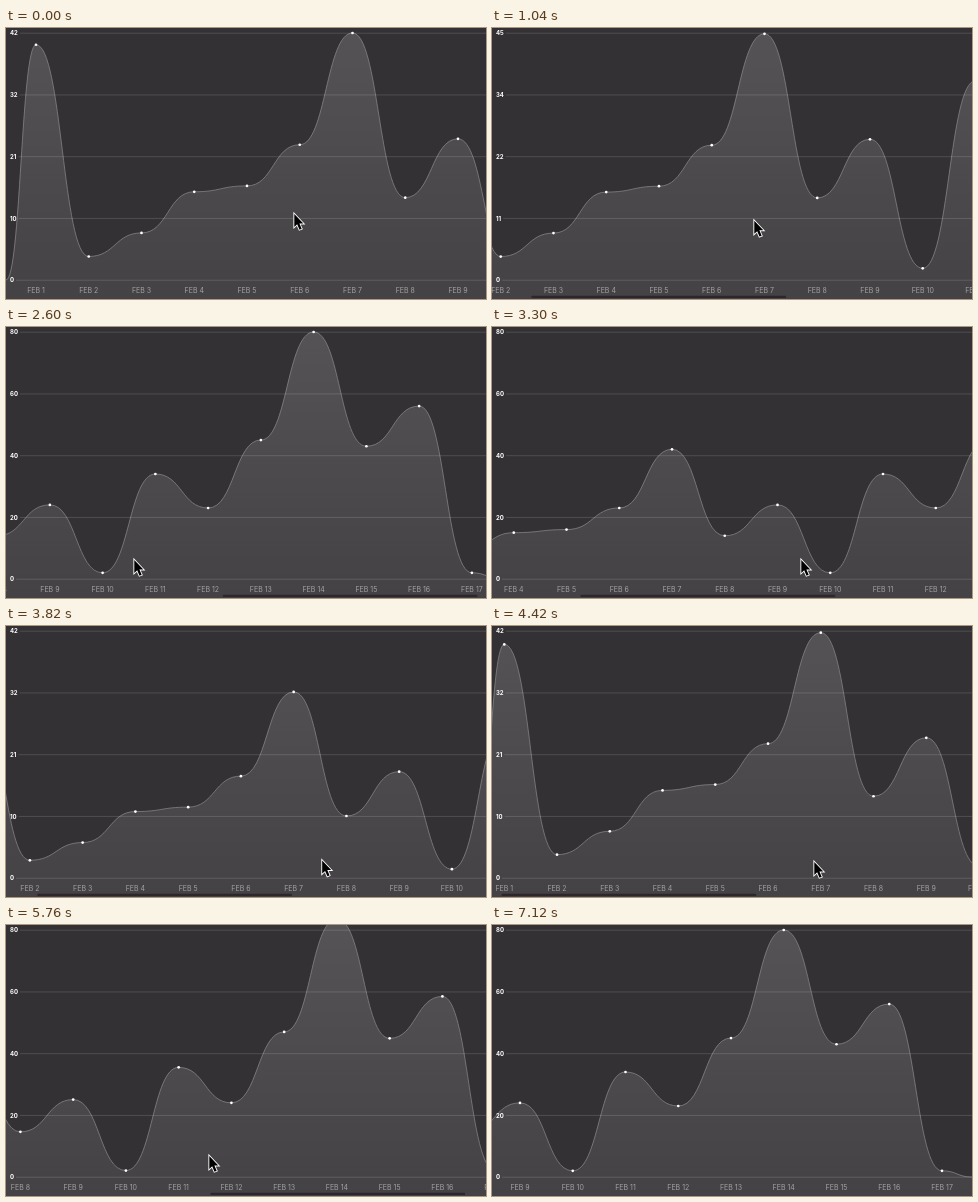
An HTML page with a canvas for the animation above (7980 ms loop, 480 by 271 pixels).

```html
<!DOCTYPE html>
<html lang="en">
<head>
<meta charset="utf-8">
<title>Scrolling chart</title>
<style>
  html, body { margin: 0; width: 100%; height: 100%; overflow: hidden; background: #333133; }
  canvas { display: block; width: 480px; height: 271px; }
</style>
</head>
<body>
<canvas id="stage"></canvas>
<script>
const W = 480, H = 271, LOOP = 7980;
const ZERO = 252, PLOT = 247, PAD = 30, STEP = 52.75;
const values = [40, 4, 8, 15, 16, 23, 42, 14, 24, 2, 34, 23, 45, 80, 43, 56, 2];
const CONTENT = 2 * PAD + STEP * (values.length - 1), MAX_SCROLL = CONTENT - W;

// Finger drags followed by a glide towards a resting place
const flicks = [
  { start: 820, end: 1132, move: 125, power: 1.5, rest: MAX_SCROLL },
  { start: 2680, end: 3132, move: -177.5, power: 1.2, rest: 0 },
  { start: 4945, end: 5245, move: 119, power: 2, rest: 529 }
];
const GLIDE = 500, SPRING = 0.0109;

// Start time and new top of the vertical range
const ranges = [[1022, 45], [1120, 80], [3474, 45], [3772, 42], [5156, 45], [5236, 80]];
const RANGE_TIME = 750;

// Pointer: time, x, y, and the power of the ease-in (0 = smooth both ways)
const pointer = [
  [0, 288, 186, 0], [720, 336, 181, 0], [820, 336, 181, 0], [1132, 211, 201, 1.5],
  [1560, 211, 202, 0], [2450, 128, 233, 0], [2680, 128, 233, 0], [3132, 308, 233, 1.2],
  [3300, 309, 233, 0], [4300, 322, 236, 0], [4945, 322, 236, 0], [5245, 204, 231, 2],
  [5760, 203, 231, 0], [6380, 190, 222, 0], [6980, 96, -24, 0]
];

const canvas = document.getElementById('stage');
const ratio = window.devicePixelRatio || 1;
canvas.width = W * ratio;
canvas.height = H * ratio;
const ctx = canvas.getContext('2d');
ctx.scale(ratio, ratio);
ctx.textBaseline = 'middle';

const shade = ctx.createLinearGradient(0, 0, 0, H);
shade.addColorStop(0, '#555355');
shade.addColorStop(1, '#444244');

const clamp = (v, lo = 0, hi = 1) => Math.min(hi, Math.max(lo, v));

function glide(from, rest, time) {
  const pos = rest + (from - rest) * Math.exp(-time / GLIDE);
  if (pos <= MAX_SCROLL) return pos;
  const hit = GLIDE * Math.log((rest - from) / (rest - MAX_SCROLL));
  const speed = (rest - MAX_SCROLL) / GLIDE, dt = time - hit;
  return MAX_SCROLL + speed * dt * Math.exp(-SPRING * dt);
}

function scrollAt(t) {
  let pos = 0;
  flicks.forEach((f, i) => {
    if (t < f.start) return;
    pos += f.move * clamp((t - f.start) / (f.end - f.start)) ** f.power;
    const until = Math.min(t, flicks[i + 1]?.start ?? LOOP);
    if (until > f.end) pos = glide(pos, f.rest, until - f.end);
  });
  return pos;
}

// Each change starts from wherever the previous one had got to
function rangeAt(t) {
  let top = 42, target = 42;
  ranges.forEach(([start, to], i) => {
    if (t < start) return;
    const until = Math.min(t, ranges[i + 1]?.[0] ?? LOOP);
    const u = clamp((until - start) / RANGE_TIME);
    top += (to - top) * u * (2 - u);
    target = to;
  });
  return { top, target };
}

function roundHalfEven(v) {
  return v % 1 === 0.5 ? 2 * Math.round(v / 2) : Math.round(v);
}

function drawGraph(scroll, top) {
  const points = values.map((v, i) => [PAD + i * STEP - scroll, ZERO - v / top * PLOT]);
  const ends = [[-scroll, ZERO], ...points, [CONTENT - scroll, ZERO]];
  ctx.beginPath();
  ctx.moveTo(-W, H + 2);
  ctx.lineTo(-W, ZERO);
  ctx.lineTo(...ends[0]);
  for (let i = 1; i < ends.length; i++) {
    const [x0, y0] = ends[i - 1], [x1, y1] = ends[i], mid = (x0 + x1) / 2;
    ctx.bezierCurveTo(mid, y0, mid, y1, x1, y1);
  }
  ctx.lineTo(2 * W, ZERO);
  ctx.lineTo(2 * W, H + 2);
  ctx.fillStyle = shade;
  ctx.fill();
  ctx.strokeStyle = '#858385';
  ctx.lineWidth = 0.8;
  ctx.stroke();

  ctx.font = '7px Inter, sans-serif';
  ctx.textAlign = 'center';
  points.forEach(([x, y], i) => {
    ctx.fillStyle = '#fff';
    ctx.beginPath();
    ctx.arc(x, y, 1.35, 0, 7);
    ctx.fill();
    ctx.fillStyle = 'rgba(255,255,255,.5)';
    ctx.fillText('FEB ' + (i + 1), x, 263.2);
  });
}

function drawScale(target) {
  ctx.font = 'bold 6px Inter, sans-serif';
  ctx.textAlign = 'left';
  ctx.fillStyle = '#fff';
  ctx.strokeStyle = 'rgba(255,255,255,.2)';
  ctx.lineWidth = 0.7;
  for (let i = 0; i <= 4; i++) {
    const y = ZERO - PLOT * i / 4 + 0.2;
    const label = String(roundHalfEven(target * i / 4));
    ctx.fillText(label, 4, y + 0.3);
    ctx.beginPath();
    ctx.moveTo(6 + ctx.measureText(label).width, y);
    ctx.lineTo(W, y);
    ctx.stroke();
  }
}

function drawScrollbar(t, scroll) {
  ctx.globalAlpha = clamp((t - 820) / 60) * clamp((6400 - t) / 250);
  const width = W * W / CONTENT;
  ctx.fillStyle = '#2d262c';
  ctx.beginPath();
  ctx.roundRect(scroll * W / CONTENT, 267.8, width, 2.2, 1.1);
  ctx.fill();
  ctx.globalAlpha = 1;
}

function drawPointer(t) {
  const next = pointer.findIndex(key => key[0] > t);
  if (next < 0) return;
  const [t0, x0, y0] = pointer[next - 1], [t1, x1, y1, power] = pointer[next];
  const u = (t - t0) / (t1 - t0);
  const e = power ? u ** power : u * u * (3 - 2 * u);
  ctx.save();
  ctx.translate(x0 + (x1 - x0) * e, y0 + (y1 - y0) * e);
  const arrow = new Path2D('M.3 0V13L3.2 10.3L5.5 15.7L7.7 14.8L5.4 9.5H9.3Z');
  ctx.strokeStyle = '#fff';
  ctx.lineWidth = 1.8;
  ctx.stroke(arrow);
  ctx.fillStyle = '#000';
  ctx.fill(arrow);
  ctx.restore();
}

function draw(now) {
  const t = now % LOOP, scroll = scrollAt(t), range = rangeAt(t);
  ctx.fillStyle = '#333133';
  ctx.fillRect(0, 0, W, H);
  drawGraph(scroll, range.top);
  drawScale(range.target);
  drawScrollbar(t, scroll);
  drawPointer(t);
}

let begin;
function tick(now) {
  begin ??= now;
  draw(now - begin);
  requestAnimationFrame(tick);
}
draw(0);
requestAnimationFrame(tick);
</script>
</body>
</html>
```
